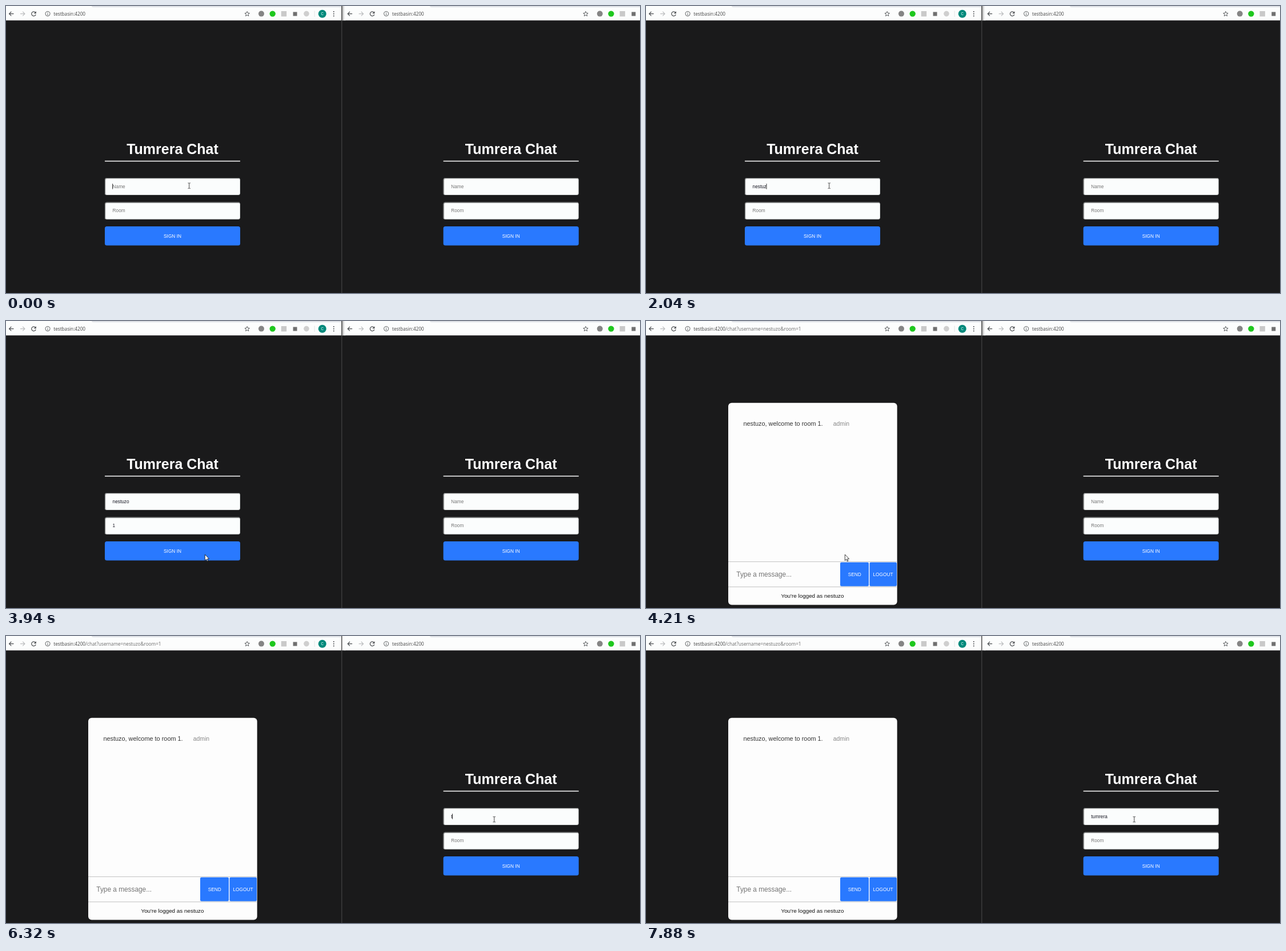
These frames come from a looping animation (1110x504 px, 8000 ms). An HTML page:

```html
<!DOCTYPE html>
<html lang="en">
<head>
<meta charset="utf-8">
<title>Chat sign in</title>
<style>
  html, body { margin: 0; width: 100%; height: 100%; overflow: hidden; background: #1a1a1b; }
  svg { display: block; width: 100vw; height: 100vh; }
  text { font-family: "Liberation Sans", Arial, sans-serif; font-size: 8.25px; white-space: pre; }
  .url { font-family: "Open Sans", sans-serif; font-size: 8.2px; fill: #444; }
  .path { fill: #6a6a6a; }
  .title { font-size: 25px; font-weight: bold; fill: #fff; }
  .mid { text-anchor: middle; }
  .button { fill: #2979ff; }
  .label { fill: #fff; text-anchor: middle; font-size: 8.3px; }
  .line { fill: none; stroke: #4a4d50; stroke-width: 1.2; }
</style>
</head>
<body>
<svg id="stage" viewBox="0 0 1110 504"></svg>
<script>
const LOOP = 8000;
const RIGHT = 592.7;
const SIGN_IN = 4210;
const RIGHT_FOCUS = 5320;
const USER = 'nestuzo';
const GUEST = 'tumrera';

const bar = (id, tabEnd) => `
  <rect width="600" height="25.3" fill="#fcfdfd"/>
  <path d="M${tabEnd} 0H600V2.2H${tabEnd + 3}Q${tabEnd} 2.2 ${tabEnd} 0" fill="#dee1e6"/>
  <path class="line" d="M13.5 13.7H5.8M9.3 10L5.6 13.7L9.3 17.4"/>
  <path class="line" style="stroke:#bbbdbf" d="M25 13.7H32.7M29.2 10L32.9 13.7L29.2 17.4"/>
  <path class="line" d="M51.4 11.3A3.8 3.8 0 1 0 52.1 15"/>
  <path d="M52.8 9.2V13.3H48.7Z" fill="#4a4d50"/>
  <circle class="line" style="stroke-width:.9" cx="73" cy="13.7" r="4"/>
  <path class="line" style="stroke-width:.9" d="M73 13V16M73 11.2V12.1"/>
  <text class="url" x="83.3" y="16.7">testbasin:4200<tspan class="path" id="${id}Path"></tspan></text>
  <path class="line" style="stroke-width:.9" d="M422.2 9.5L423.4 12.3L426.4 12.6L424.1 14.6L424.8 17.6L422.2 16L419.6 17.6L420.3 14.6L418 12.6L421 12.3Z"/>
  <circle cx="447" cy="13.6" r="5" fill="#858585"/>
  <circle cx="466.7" cy="13.6" r="5.2" fill="#1ec71e"/>
  <rect x="481.8" y="9" width="9.4" height="9.4" fill="#c9c9c9"/>
  <rect x="502.6" y="10.5" width="7" height="7" fill="#707070"/>`;

const field = (id, y, hint) => `
  <rect x="173" y="${y}" width="237" height="30" rx="3.5" fill="#d5d8d8"/>
  <path d="M173.6 ${y + 29}V${y + 3.5}Q173.6 ${y + .6} 176.5 ${y + .6}H409" fill="none" stroke="#858787" stroke-width="1.4"/>
  <rect x="174.4" y="${y + 1.4}" width="234.6" height="27.6" rx="2.5" fill="#fbfdfd"/>
  <text id="${id}" data-hint="${hint}" x="186.6" y="${y + 17.6}"></text>
  <rect id="${id}Caret" y="${y + 10}" width=".9" height="9.6" fill="#222"/>`;

const form = side => `
  <text class="title mid" x="291.5" y="260">Tumrera Chat</text>
  <rect x="173" y="271.7" width="237" height="1.5" fill="#fff"/>
  ${field(side + 'Name', 302, 'Name')}
  ${field(side + 'Room', 344.7, 'Room')}
  <rect class="button" x="173" y="387" width="237" height="33.5" rx="3.5"/>
  <text class="label" x="291.5" y="406.6">SIGN IN</text>`;

const chat = `
  <rect x="144" y="143.7" width="295.7" height="354.8" rx="6" fill="#fdfdfd"/>
  <text x="170.4" y="184" style="font-size:10.9px" fill="#333">${USER}, welcome to room 1.</text>
  <text x="327.8" y="184" style="font-size:10.4px" fill="#888">admin</text>
  <path d="M144 422.6H439.7M144 466.9H439.7" stroke="#ccc" stroke-width="1.4"/>
  <text x="158.3" y="448.6" style="font-size:11.85px" fill="#757575">Type a message...</text>
  <rect class="button" x="340" y="423.8" width="50" height="42" rx="2.2"/>
  <rect class="button" x="391.4" y="423.8" width="47.6" height="42" rx="2.2"/>
  <text class="label" x="365.3" y="447.8">SEND</text>
  <text class="label" x="415" y="447.8">LOGOUT</text>
  <text class="mid" x="291.5" y="486" style="font-size:9.87px" fill="#111">You're logged as ${USER}</text>`;

document.getElementById('stage').innerHTML = `
  <defs><linearGradient id="shade">
    <stop stop-color="#999"/><stop offset="1" stop-color="#fcfdfd" stop-opacity="0"/>
  </linearGradient></defs>
  <rect width="1110" height="504" fill="#1a1a1b"/>
  <g transform="translate(${RIGHT})">${bar('right', 149.5)}${form('right')}</g>
  <rect x="588" width="6" height="25.3" fill="#fcfdfd"/>
  <rect id="shadow" x="588.5" width="6" height="25.3" fill="url(#shade)"/>
  <svg width="588" height="504">
    ${bar('left', 150)}
    <circle cx="526" cy="13.6" r="4.8" fill="#cfcfcf"/>
    <path d="M540.2 8.5V19" stroke="#ddd" stroke-width=".8"/>
    <circle cx="553.8" cy="13.7" r="7" fill="#00897b"/>
    <text class="mid" x="553.8" y="16" style="font-size:6.3px" fill="#fff">C</text>
    <g fill="#4a4d50"><circle cx="573.8" cy="10" r="1"/><circle cx="573.8" cy="13.7" r="1"/><circle cx="573.8" cy="17.4" r="1"/></g>
    <g id="leftForm">${form('left')}</g>
    <g id="chat">${chat}</g>
  </svg>
  <rect x="587.2" width="1.3" height="25.3" fill="#333"/>
  <rect x="587.2" y="25.3" width="1.3" height="479" fill="#414143"/>
  <path id="beam" d="M-2.2 -4.7H-.6L0 -4.2L.6 -4.7H2.2M0 -4.2V4.2M-2.2 4.7H-.6L0 4.2L.6 4.7H2.2" fill="none" stroke="#333" stroke-width=".9"/>
  <path id="arrow" d="M0 0V10.7L2.5 8.4L4.1 12L5.7 11.3L4.1 7.8H7.4Z" fill="#fff" stroke="#111" stroke-width=".8"/>`;

const el = Object.fromEntries([...document.querySelectorAll('[id]')].map(e => [e.id, e]));

// Field steps: [time, typed letters, caret shown]
const typing = {
  leftName: [USER, [[0, 0, 1], [470, 0, 0], [910, 0, 1], [1060, 1, 1], [1340, 3, 1], [1640, 4, 1],
    [1770, 5, 1], [2040, 6, 1], [2190, 7, 1], [2620, 7, 0]]],
  leftRoom: ['1', [[0, 0, 0], [2890, 0, 1], [3330, 1, 1], [3640, 1, 0]]],
  rightName: [GUEST, [[0, 0, 0], [RIGHT_FOCUS, 0, 1], [5880, 0, 0], [6320, 1, 1], [6460, 2, 1], [6600, 3, 1],
    [6740, 4, 1], [7020, 5, 1], [7170, 6, 1], [7320, 7, 1], [7880, 7, 0]]],
  rightRoom: ['', [[0, 0, 0]]]
};

// Pointer steps: [time, x, y, shape]
const pointer = [
  [0, 320.7, 315.6, 'beam'], [3640, 337, 323, 'beam'], [3790, 349, 361, 'beam'], [3940, 348.3, 410, 'arrow'],
  [4490, 364, 435, 'arrow'], [4630, 388, 394, 'arrow'], [4760, 432, 363, 'arrow'], [4900, 588, 346, 'arrow'],
  [5030, 770, 330, 'beam'], [5170, 854.8, 322, 'beam']
];

const stepAt = (steps, t) => steps.findLast(step => step[0] <= t);
const show = (e, on) => e.style.display = on ? '' : 'none';

function drawField(id, t) {
  const [word, steps] = typing[id];
  const [, count, caretOn] = stepAt(steps, t);
  const text = el[id], caret = el[id + 'Caret'];
  text.textContent = count ? word.slice(0, count) : text.dataset.hint;
  text.setAttribute('fill', count ? '#151520' : '#757575');
  caret.setAttribute('x', 186.2 + (count ? text.getComputedTextLength() : 0));
  show(caret, caretOn);
}

function draw(now) {
  const t = now % LOOP;
  const signedIn = t >= SIGN_IN;
  show(el.leftForm, !signedIn);
  show(el.chat, signedIn);
  show(el.shadow, t < RIGHT_FOCUS);
  el.leftPath.textContent = signedIn ? `/chat?username=${USER}&room=1` : '';
  Object.keys(typing).forEach(id => drawField(id, t));

  const [, x, y, shape] = stepAt(pointer, t);
  for (const name of ['beam', 'arrow']) {
    show(el[name], name === shape);
    el[name].setAttribute('transform', `translate(${x} ${y})`);
  }
}

const start = performance.now();
function tick() {
  draw(performance.now() - start);
  requestAnimationFrame(tick);
}
tick();
</script>
</body>
</html>
```
